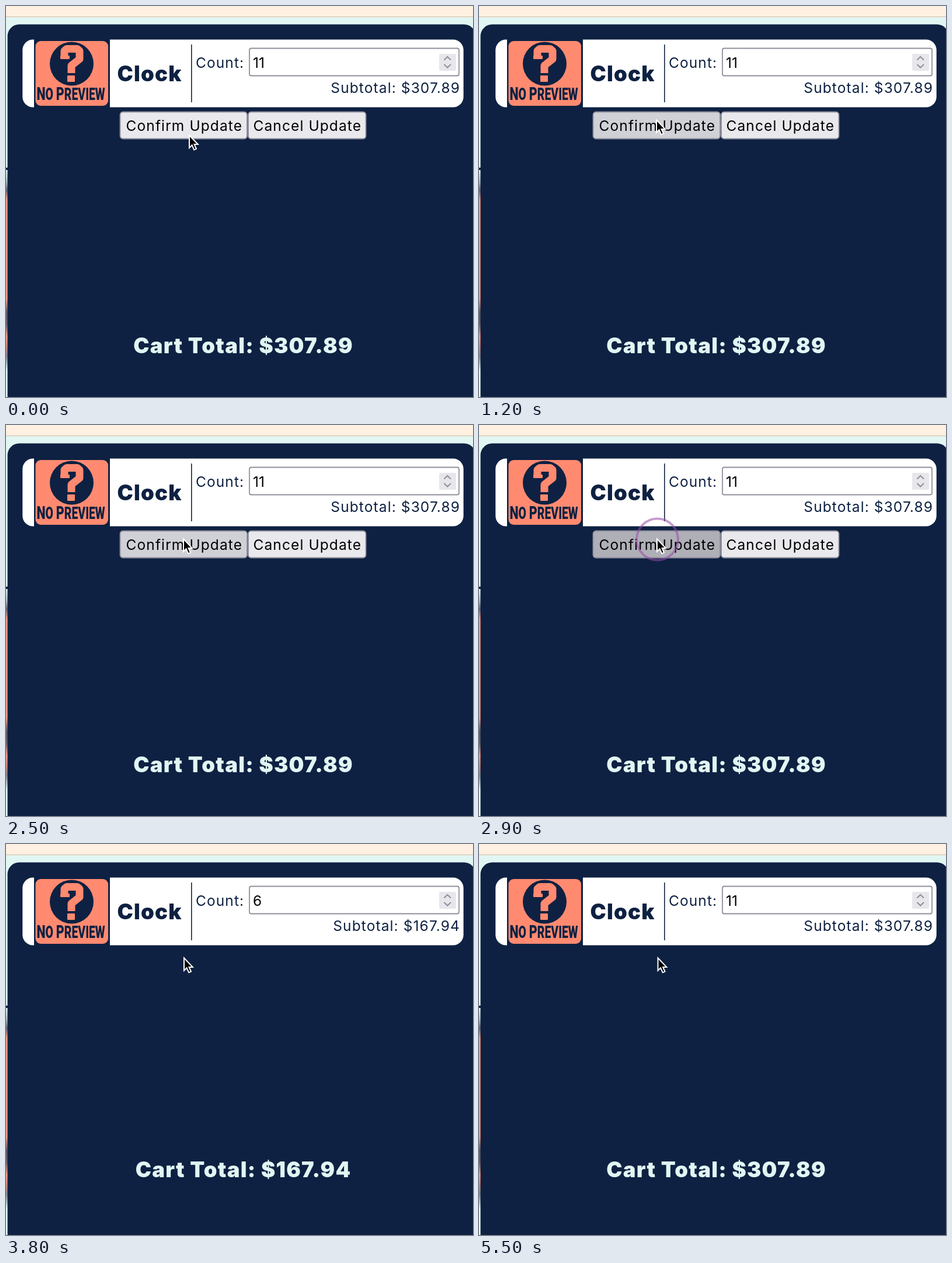
Recreate the animation shown at these times as an HTML page with a canvas. Size 800 by 670 pixels, loop 5.6 s.

```html
<!DOCTYPE html>
<html lang="en">
<head>
<meta charset="utf-8">
<title>Cart update</title>
<style>
  html, body { margin: 0; width: 100%; height: 100%; overflow: hidden; background: #0e2142; }
  canvas { display: block; }
</style>
</head>
<body>
<canvas id="stage" width="800" height="670"></canvas>
<script>
const ctx = document.getElementById('stage').getContext('2d');
const LOOP = 5600, STEP = 100;
const NAVY = '#0e2142', MINT = '#e1f6f3', SALMON = '#ff8a70', EDGE = '#8f8f9d';
const REGULAR = '400 24.5px Inter, "Open Sans", sans-serif';
const HEAVY = '900 36.5px Inter, "Open Sans", sans-serif';
const CONFIRMED = 3100, SAVED = 4000;

const clamp = v => Math.min(1, Math.max(0, v));
const progress = (t, from, to) => clamp((t - from) / (to - from));
const easeOut = u => 1 - (1 - u) ** 3;
const mix = (a, b, u) => a + (b - a) * u;

function box(x, y, w, h, r, fill, edge) {
  ctx.beginPath();
  ctx.roundRect(x, y, w, h, r);
  ctx.fillStyle = fill;
  ctx.fill();
  if (edge) {
    ctx.strokeStyle = edge;
    ctx.lineWidth = 1.8;
    ctx.stroke();
  }
}

function line(points, color, width) {
  ctx.beginPath();
  points.forEach(([x, y]) => ctx.lineTo(x, y));
  ctx.strokeStyle = color;
  ctx.lineWidth = width;
  ctx.stroke();
}

function label(text, x, y, color, font = REGULAR, align = 'left', gap = 1.1) {
  ctx.font = font;
  ctx.letterSpacing = gap + 'px';
  ctx.textAlign = align;
  ctx.fillStyle = color;
  ctx.fillText(text, x, y);
}

function drawPage() {
  box(0, 0, 800, 670, 0, MINT);
  box(0, 0, 800, 18, 0, '#fff0e2');
  box(0, 18, 800, 1, 0, '#d9b8a2');

  const strip = ctx.createLinearGradient(0, 281, 0, 625);
  [[0, MINT], [0.06, '#a9b9bd'], [0.1, '#626575'], [0.15, '#fb9a84'], [0.64, '#fb9a84'],
   [0.71, '#5d5866'], [0.77, '#6d6069'], [0.83, '#fb9a84'], [0.88, '#d58678'],
   [0.93, '#7f8993'], [1, MINT]].forEach(([at, color]) => strip.addColorStop(at, color));
  box(0, 281, 3, 344, 0, strip);
  box(0, 277, 3, 4, 0, NAVY);
  box(2.6, 31.6, 802, 660, 20, NAVY);
}

function drawPreview() {
  box(48, 57, 130, 117, 0, NAVY);
  box(50.5, 60, 124.5, 111, 9, SALMON);
  ctx.beginPath();
  ctx.arc(112.5, 99, 37.5, 0, Math.PI * 2);
  ctx.fillStyle = NAVY;
  ctx.fill();

  ctx.lineJoin = 'round';
  line([[100, 90], [100, 77], [104, 73.5], [122, 73.5], [126, 77], [126, 91], [112, 102], [112, 115]], SALMON, 13);
  box(93, 85, 16, 6, 1, SALMON);
  box(105, 119, 13, 11, 1, SALMON);

  // Tall small-caps lettering
  ctx.save();
  ctx.translate(52.5, 160.5);
  ctx.scale(1, 1.5);
  let x = 0;
  for (const [text, size] of [['N', 21.5], ['O ', 19.4], ['P', 21.5], ['REVIEW', 19.4]]) {
    label(text, x, 0, NAVY, `800 ${size}px Roboto, sans-serif`, 'left', 0);
    x += ctx.measureText(text).width;
  }
  ctx.restore();
}

function drawCard(count, price) {
  box(28.3, 57.4, 755.4, 116.2, 18, '#fff');
  drawPreview();
  label('Clock', 190.5, 129, NAVY, HEAVY, 'left', 1.2);
  box(317, 66, 1.6, 99, 0, NAVY);
  label('Count:', 325, 105.5, NAVY);
  box(417, 72.5, 359, 47, 3, '#fff', EDGE);
  label(count, 423, 105.5, '#000', REGULAR, 'left', 0);
  box(742, 82, 29, 29, 2, '#e7e7eb');
  ctx.lineJoin = 'miter';
  line([[750.5, 92.5], [756.2, 87], [762, 92.5]], EDGE, 2);
  line([[750.5, 100], [756.2, 105.5], [762, 100]], EDGE, 2);
  label('Subtotal: ' + price, 778, 149, NAVY, REGULAR, 'right');
}

function drawButtons(t) {
  const fill = t >= 2800 ? '#afafb7' : t >= 100 ? '#d0d0d7' : '#e9e9ed';
  box(195.5, 181.5, 217.5, 46, 5, fill, EDGE);
  box(415, 181.5, 201.5, 46, 5, '#e9e9ed', EDGE);
  label('Confirm Update', 305.3, 213.5, '#000', REGULAR, 'center');
  label('Cancel Update', 516.3, 213.5, '#000', REGULAR, 'center');
}

function drawRing(t) {
  const u = progress(t, 2700, 3600);
  if (u <= 0 || u >= 1) return;
  ctx.beginPath();
  ctx.arc(305.5, 196, mix(30.2, 53.8, u), 0, Math.PI * 2);
  ctx.strokeStyle = `rgba(150, 75, 170, ${0.57 * (1 - u * u * 0.7) * Math.min(1, (1 - u) * 4)})`;
  ctx.lineWidth = mix(4.3, 2.5, u);
  ctx.stroke();
}

function drawCursor(t) {
  const u = easeOut(progress(t, 0, 500));
  const drift = progress(t, 2600, 2800) + 1.5 * progress(t, 5400, 5500);
  ctx.save();
  ctx.translate(mix(314, 304, u) + drift, mix(221.5, 195.3, u));
  ctx.beginPath();
  [[0, 0], [0, 21.5], [4.6, 17], [8.2, 25], [12, 23.3], [8.6, 15.6], [14.8, 15.6]]
    .forEach(([x, y]) => ctx.lineTo(x, y));
  ctx.closePath();
  ctx.lineJoin = 'miter';
  ctx.fillStyle = '#000';
  ctx.fill();
  ctx.strokeStyle = '#fff';
  ctx.lineWidth = 2;
  ctx.stroke();
  ctx.restore();
}

function draw(t) {
  const editing = t < CONFIRMED;
  const pending = !editing && t < SAVED;
  const price = pending ? '$167.94' : '$307.89';
  drawPage();
  drawCard(pending ? '6' : '11', price);
  if (editing) drawButtons(t);
  label('Cart Total: ' + price, 406.5, editing ? 595 : 571, MINT, HEAVY, 'center', 1.2);
  drawRing(t);
  drawCursor(t);
}

const start = performance.now();
function tick() {
  const t = (performance.now() - start) % LOOP;
  draw(Math.floor(t / STEP) * STEP);
  requestAnimationFrame(tick);
}
tick();
</script>
</body>
</html>
```
